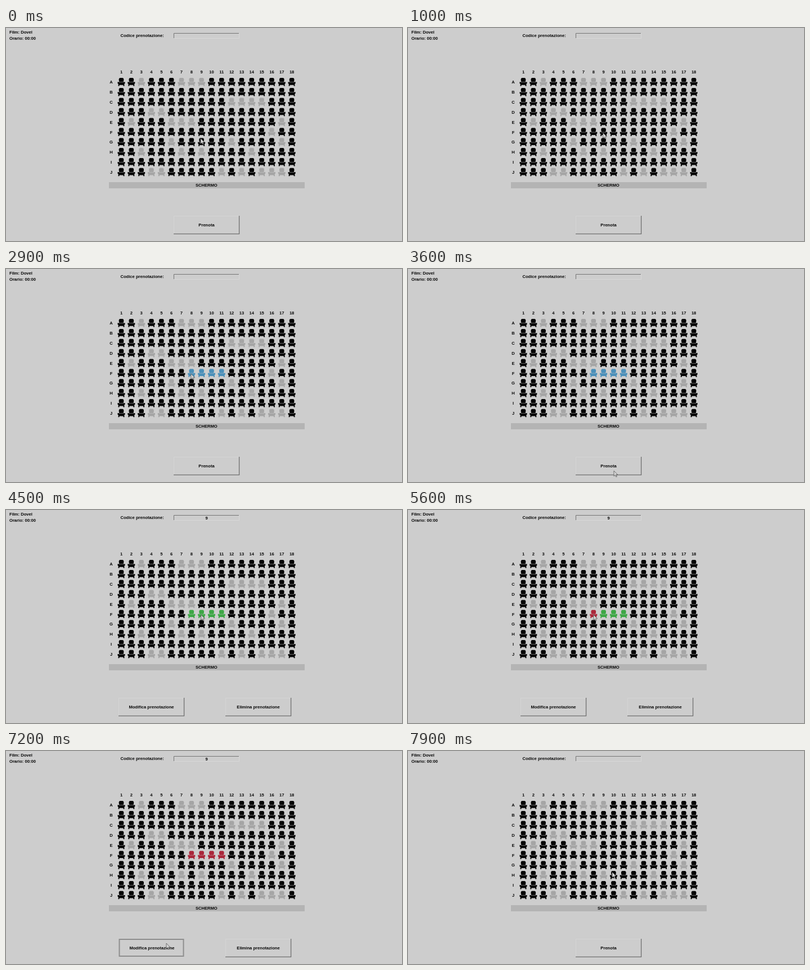
An HTML page for the animation above (8 s loop, 704 by 380 pixels).

```html
<!DOCTYPE html>
<html lang="it">
<head>
<meta charset="utf-8">
<style>
html, body { margin: 0; width: 100%; height: 100%; overflow: hidden; background: #cdcdcd; }
svg { display: block; width: 704px; height: 380px; }
text { font: bold 7.6px "Liberation Sans", Arial, sans-serif; fill: #080808; }
.mid { text-anchor: middle; }
.edge { fill: none; }
</style>
</head>
<body>
<svg viewBox="0 0 704 380">
  <defs>
    <path id="seat" d="M-4.4-4Q-4.4-7.5-2-7.5H2Q4.4-7.5 4.4-4L3.7 0H-3.7Z
      M-6.5-.3H-4.6L-3.8.5H3.8L4.6-.3H6.5V2.4L5.2 3.4L5.6 7H3.7L3.2 5.2H-3.2L-3.7 7H-5.6L-5.2 3.4L-6.5 2.4Z"/>
  </defs>
  <text x="6" y="10">Film: Dovel</text>
  <text x="6" y="21">Orario: 00:00</text>
  <text x="203.5" y="15.7">Codice prenotazione:</text>
  <path class="edge" d="M298.5 18V9.5H414" stroke="#747474"/>
  <path class="edge" d="M299 18.5H414.5V9" stroke="#d8d8d8"/>
  <text id="code" class="mid" x="356.5" y="16.7">9</text>
  <g id="hall"></g>
  <rect x="183" y="275" width="348" height="11" fill="#b4b4b4"/>
  <text class="mid" x="356.3" y="282.5">SCHERMO</text>
  <g id="buttons"></g>
  <path id="cursor" d="M0 0V9.6L2.3 7.6 3.9 11 5.4 10.3 3.9 7H6.8Z" fill="#d4d4d4" stroke="#333" stroke-width=".6"/>
</svg>
<script>
const LOOP = 8000, FRAME = 100;
const BLACK = '#050505', GREY = '#a5a5a5', BLUE = '#4a8fb9', GREEN = '#3da745', RED = '#ab263a';
const ROWS = 'ABCDEFGHIJ', COLS = 18;
const TAKEN = 'A3 A7-9 C12-15 D4-5 E2 E6-8 E17 F16 G6 G12 G17 H3 H7 H9 H14 J4-5 J11 J13 J15-17';
const byId = id => document.getElementById(id);

function add(parent, tag, attrs, text = '') {
  const node = document.createElementNS('http://www.w3.org/2000/svg', tag);
  for (const key in attrs) node.setAttribute(key, attrs[key]);
  node.textContent = text;
  return parent.appendChild(node);
}

const hall = byId('hall'), seats = {};
const colX = n => 205 + (n - 1) * 17.83;
const rowY = row => 96.6 + ROWS.indexOf(row) * 17.85;

for (let n = 1; n <= COLS; n++) add(hall, 'text', { class: 'mid', x: colX(n), y: 81.2 }, n);
for (const row of ROWS) {
  add(hall, 'text', { class: 'mid', x: 187, y: rowY(row) + 2.7 }, row);
  for (let n = 1; n <= COLS; n++)
    seats[row + n] = add(hall, 'use', { href: '#seat', x: colX(n), y: rowY(row), fill: BLACK });
}
for (const block of TAKEN.split(' ')) {
  const [first, last = first] = block.slice(1).split('-');
  for (let n = +first; n <= +last; n++) seats[block[0] + n].setAttribute('fill', GREY);
}

function makeButton(x, label) {
  const group = add(byId('buttons'), 'g', {});
  const raised = add(group, 'g', {});
  add(raised, 'path', { class: 'edge', d: `M${x + .5} 368V335.5H${x + 117}`, stroke: '#d5d5d5' });
  add(raised, 'path', { class: 'edge', d: `M${x} 367.4H${x + 116.6}V335`, stroke: '#707070', 'stroke-width': 1.3 });
  const sunken = add(group, 'rect', {
    class: 'edge', x: x + 1.5, y: 336, width: 114, height: 30, stroke: '#8e8e8e', 'stroke-width': 2
  });
  const text = add(group, 'text', { class: 'mid', x: x + 58.5, y: 353.7 }, label);
  return (visible, pressed) => {
    group.setAttribute('display', visible ? 'inline' : 'none');
    raised.setAttribute('display', pressed ? 'none' : 'inline');
    sunken.setAttribute('display', pressed ? 'inline' : 'none');
    text.setAttribute('transform', `translate(${pressed ? 1 : 0})`);
  };
}
const book = makeButton(298, 'Prenota');
const modify = makeButton(200, 'Modifica prenotazione');
const remove = makeButton(390, 'Elimina prenotazione');

const BOOKED = 3800, OPENED = 4400, SAVED = 7300, CLICK_GAP = 350;
const pickTime = n => n === 8 ? 2800 : 1300 + (n - 9) * CLICK_GAP;
const dropTime = n => 5500 + (n - 8) * CLICK_GAP;
const booking = [8, 9, 10, 11];

const onSeat = n => [colX(n) - 1, rowY('F') + 1];
const route = [
  [0, [346, 197]],
  ...booking.map(n => [pickTime(n), onSeat(n)]),
  [BOOKED, [366, 360]],
  [OPENED, onSeat(9)],
  ...booking.map(n => [dropTime(n), onSeat(n)]),
  [SAVED, [285, 343]],
  [LOOP, [363, 216]]
].sort((a, b) => a[0] - b[0]);

// The cursor rests around each click and eases between them.
function cursorAt(t) {
  const i = route.findIndex(stop => stop[0] > t);
  const [t0, from] = route[i - 1], [t1, to] = route[i];
  const u = Math.min(1, Math.max(0, ((t - t0) / (t1 - t0) - .2) / .6));
  const k = u * u * (3 - 2 * u);
  return from.map((v, axis) => v + (to[axis] - v) * k);
}

function seatColor(t, n) {
  if (t < pickTime(n) || t >= SAVED) return BLACK;
  if (t < BOOKED) return BLUE;
  if (t < OPENED) return GREY;
  return t < dropTime(n) ? GREEN : RED;
}

function draw(now) {
  const t = Math.floor(now % LOOP / FRAME) * FRAME;
  const editing = t >= OPENED && t < SAVED;
  for (const n of booking) seats['F' + n].setAttribute('fill', seatColor(t, n));
  byId('code').setAttribute('visibility', editing ? 'visible' : 'hidden');
  book(!editing, t >= BOOKED - FRAME && t < BOOKED);
  modify(editing, t >= SAVED - FRAME);
  remove(editing, false);
  byId('cursor').setAttribute('transform', `translate(${cursorAt(t)})`);
}

const start = performance.now();
function tick() {
  draw(performance.now() - start);
  requestAnimationFrame(tick);
}
tick();
</script>
</body>
</html>
```
